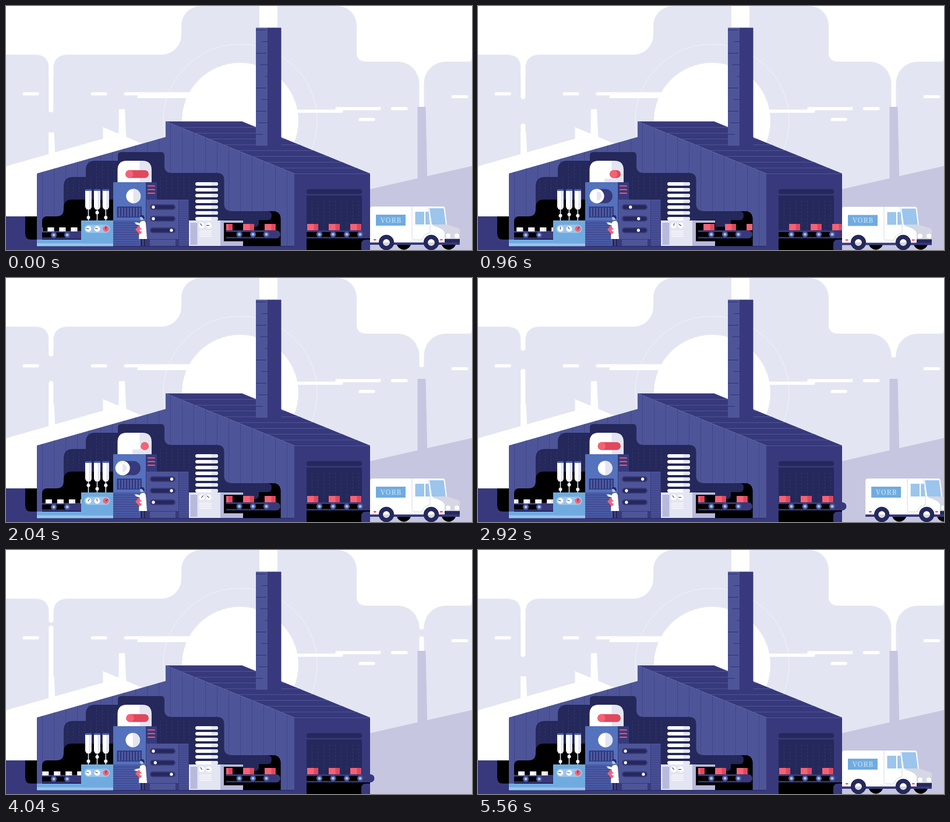
Write an HTML page that moves like this. It is 800 by 421 pixels and loops after 5600 ms.

```html
<!DOCTYPE html>
<html lang="en">
<head>
<meta charset="utf-8">
<title>Factory</title>
<style>
  html, body { margin: 0; width: 100%; height: 100%; overflow: hidden; background: #fff; }
  svg { display: block; width: 100vw; height: 100vh; }
  .sky { fill: #e3e5f2; } .hill { fill: #c6c6e0; } .white { fill: #fff; }
  .wall { fill: #4d5598; } .navy { fill: #37397c; } .dark { fill: #25285a; }
  .blue { fill: #70abdf; } .pale { fill: #9bc5ec; }
  .red { fill: #f46273; } .crimson { fill: #e0485d; }
  .line { fill: none; stroke-linecap: round; }
  .cloud { stroke: #fff; stroke-width: 5.4; }
  .smoke { stroke: #fff; stroke-width: 8; }
  .hand { stroke: #25285a; stroke-width: 1; }
  .sign { font: 900 12px "Noto Serif", "DejaVu Serif", serif; letter-spacing: .5px; fill: #b0d5f5; }
</style>
</head>
<body>
<svg viewBox="0 0 800 421" preserveAspectRatio="none">
  <defs>
    <pattern id="planks" x="52" width="20" height="20" patternUnits="userSpaceOnUse"><path d="M10.5 0V20" stroke="#40468a"/></pattern>
    <pattern id="tiles" y="204" width="20" height="10" patternUnits="userSpaceOnUse"><path d="M0 5.5H20" stroke="#4d5598"/></pattern>
    <pattern id="mesh" x="525" width="10" height="6" patternUnits="userSpaceOnUse"><path d="M.5 0V3" stroke="#34376d"/></pattern>
    <pattern id="ribs" y="372" width="10" height="4" patternUnits="userSpaceOnUse"><path d="M0 2.5H10" stroke="#3d4389"/></pattern>
    <pattern id="bars" x="193" width="5" height="10" patternUnits="userSpaceOnUse"><path d="M1.5 0V10" stroke="#5472bd" stroke-width="1.6"/></pattern>
    <clipPath id="leftBelt"><path d="M62 375H129V392H62Z"/></clipPath>
    <clipPath id="midBelt"><path d="M378 370H471V390H378Z"/></clipPath>
    <clipPath id="rightBelt"><path d="M516 370H625V390H516Z"/></clipPath>
    <clipPath id="dome"><path d="M191.500 304V283Q191.500 267 207.500 267H234Q250 267 250 283V304Z"/></clipPath>
  </defs>

  <!-- sky -->
  <path class="sky" d="M0 84H50Q73.500 84 73.500 108V240H81.500V108Q81.500 84 106 84H266C286 84 301 69 301 49V35C301 15 316 0 336 0H435V37H466V0H568C588 0 602 15 602 34V80Q602 96 618 96H672C693 96 709.500 113 709.500 134V200H717.500V134C717.500 113 734 96 756 96H797Q800 95 800 84V421H0Z"/>
  <path class="sky" d="M73 121V240H82V121A4.250 4.250 0 0 1 73 121ZM709 133V200H718V133A4.250 4.250 0 0 1 709 133Z"/>
  <g id="smoke"></g>
  <circle class="white" cx="402" cy="198" r="100"/>
  <circle cx="402" cy="198" r="132" fill="none" stroke="#fff" stroke-dasharray="1.500 1"/>
  <path class="line cloud" d="M31 151.500H54M148 151.500H171M205 151.500H330M228 156.200H330M490 181.500H576M568 177H641M663.500 177H687M608 195.800H631M767.500 156.500H791"/>
  <path class="white" d="M73 218H82.500L84.500 260H73ZM194 178H204L207 240H193ZM0 276.500L166.500 229V209L240 240V363H0Z"/>
  <path class="hill" d="M706.500 174H720.500L723.500 310H706.500ZM625 316L800 276V421H625Z"/>
  <path class="navy" d="M0 363H53V421H0Z"/>
  <path d="M33 363H54V403H43Q33 403 33 393Z"/>

  <!-- building -->
  <path id="front" class="wall" d="M53 289L274 226V199L495 289V421H53Z"/>
  <path fill="url(#planks)" d="M53 289L274 226V199L495 289V421H53Z"/>
  <path class="navy" d="M274 199H405L625 289V421H495V289Z"/>
  <path fill="url(#tiles)" d="M274 199H405L625 289H495Z"/>
  <path stroke="#4d5598" d="M495 289.500H625"/>
  <path class="wall" d="M429 37.500H449V241H429Z"/>
  <path class="navy" d="M449 37.500H472.500V241H449Z"/>
  <path stroke="#2e3171" d="M429 41.500H447M439 61.500H449M429 81.500H447M436 101.500H449M445 121.500H449M429 141.500H447M439 161.500H449M429 181.500H447M433 201.500H449M429 221.500H441"/>

  <!-- loading door -->
  <rect class="dark" x="516" y="316" width="95" height="8.500" rx="4"/>
  <path class="dark" d="M516 327H611V388H516Z"/>
  <path fill="url(#mesh)" d="M520 333H607V386H520Z"/>
  <path d="M516 388H625V421H516Z"/>
  <path class="navy" d="M625 403V421H610V411Q610 403 618 403Z"/>

  <!-- cutaway -->
  <path class="dark" id="room" d="M62 414V372Q62 363 71 363H87Q99 363 99 351V311Q99 295 115 295H137V283Q137 267 153 267H192V258Q192 252 198 252H266Q272 252 272 258V276Q272 288 284 288H362Q374.500 288 374.500 300V341Q374.500 354 388 354H458Q471.500 354 471.500 368V414Z"/>
  <path fill="url(#mesh)" d="M103 300H190V331H103ZM152 271H190V300H152ZM262 293H324V331H262Z"/>
  <path d="M62 403V372Q62 363 71 363H87Q99 363 99 351V348Q99 334 113 334H184V403Z"/>
  <path d="M374 369.500H407V414H374ZM407 381H428Q434 381 434 375V369.500H449Q456 369.500 456 362Q456 354 449 354H458Q471.500 354 471.500 368V414H407Z"/>
  <path class="navy" d="M53 414H495V421H53Z"/>
  <path stroke="#25285a" d="M53 414.500H495"/>

  <!-- filling line -->
  <g id="belts"></g>
  <path class="blue" d="M53 403H184V410H53Z"/>
  <path class="pale" d="M53 409.500H184V414.500H53Z"/>
  <g clip-path="url(#leftBelt)"><g id="cartons"></g></g>
  <path class="blue" d="M129 370H184V409.500H129Z"/>
  <rect class="pale" x="134.500" y="377.500" width="44" height="14" rx="7"/>
  <g id="tubes"></g>

  <!-- press -->
  <g clip-path="url(#dome)">
    <path class="white" d="M191 267H230V304H191Z"/>
    <path class="sky" d="M229.500 267H250V304H229.500Z"/>
    <rect id="tab" class="sky" x="217" y="304" width="20" height="12" rx="2"/>
  </g>
  <path id="plunger" class="line" stroke="#e0485d" stroke-width="13.400"/>
  <circle id="plungerTip" class="red" cy="290" r="6.700"/>
  <path fill="#5472bd" d="M184 304H240V370H184Z"/>
  <path class="navy" d="M240 304H259V334H240Z"/>
  <path class="line" stroke="#f05a6c" stroke-width="2" d="M244 310.500H255M244 316.700H255M244 322.900H255"/>
  <path id="dialSlot" class="line" stroke="#37397c" stroke-width="24.600"/>
  <g id="dial"><circle class="white" r="12.500"/><path id="dialShade" class="sky" d="M0 -12.500A12.500 12.500 0 0 1 0 12.500Z"/></g>
  <path class="navy" d="M190.500 346H233V365H190.500Z"/>
  <path fill="url(#bars)" d="M192 348H232V363.500H192Z"/>
  <path fill="#4a5aa5" d="M184 370H240V414H184Z"/>
  <path fill="url(#ribs)" d="M184 372H228V412H184Z"/>

  <!-- control cabinet -->
  <path class="wall" d="M240 334H297V414H240Z"/>
  <path fill="#474e94" d="M297 334H313.500V414H297Z"/>
  <path fill="url(#ribs)" d="M298 335H312V412H298Z"/>
  <path stroke="#37397c" d="M296.500 334V414M247 402.500H291M240.500 334V414"/>
  <path class="navy" d="M240 402H247V414H240ZM291 402H297V414H291Z"/>
  <path class="line" stroke="#37397c" stroke-width="10" d="M252 347H286M252 367H286M252 387H286"/>
  <path class="line" stroke="#25285a" stroke-width="6" d="M252 347H286M252 367H286M252 387H286"/>
  <g class="white"><circle class="knob" cy="347" r="2.700"/><circle class="knob" cy="367" r="2.700"/><circle class="knob" cy="387" r="2.700"/></g>

  <!-- engineer -->
  <path class="dark" d="M231 400H234.500V414H231ZM236 400H239.500V414H236Z"/>
  <path class="white" d="M230 373Q233 370 238 371L240 374L242 402H228Z"/>
  <circle class="pale" cx="233.500" cy="366" r="3.500"/>
  <path class="dark" d="M229.500 363Q231 360 235 361Q239 363 237 369L234.500 365Z"/>
  <g id="arm"><path class="line" stroke="#fff" stroke-width="3.500" d="M233 378L224 375"/><circle class="pale" cx="222.500" cy="374" r="1.600"/></g>
  <path class="red" d="M222 386L228 379L235 388L230 394Z"/>
  <path class="line" stroke="#fff" stroke-width="3" d="M238 378L237 389L231 387"/>

  <!-- packing machine -->
  <path class="line" stroke="#fff" stroke-width="6" d="M328 307H361M328 317H361M328 327H361M328 337H361M328 347H361M328 357H361M328 367H361"/>
  <path class="line" stroke="#e3e5f2" stroke-width="6" d="M355 307H361M355 317H361M355 327H361M355 337H361M355 347H361M355 357H361M355 367H361"/>
  <path class="sky" d="M314 370H368V414H314Z"/>
  <path fill="#b7badb" d="M316.500 374H328.500V412H316.500ZM368 370H407V374H374V406H407V414H368Z"/>
  <path stroke="#fff" d="M332 388.500H353M332 391.500H353M332 394.500H353M332 397.500H353"/>
  <g id="gauges"></g>
  <g clip-path="url(#midBelt)"><g id="midBoxes"></g></g>
  <g clip-path="url(#rightBelt)"><g id="rightBoxes"></g></g>

  <!-- van -->
  <g id="van">
    <circle cx="683" cy="408" r="12.500"/><circle cx="760" cy="408" r="12.500"/>
    <g id="vanBody">
      <path class="white" d="M625 410V350Q625 346 629 346H750Q753 346 753.500 349L757 378L775 383Q779 384 779 389V410Z"/>
      <path fill="#d5d7e2" d="M733 377H757L775 383Q779 384 779 389V402H753V392Q752 384 733 379Z"/>
      <path class="pale" d="M727 349H751.500L755 377H731ZM702.500 355H718V377H702.500ZM720 355H725.500L727.500 377H720Z"/>
      <path fill="none" stroke="#d5d7e2" d="M697 346V399Q697 403.500 701 403.500H714Q716 394 728 391V377L725 347"/>
      <circle class="white" cx="759" cy="396.500" r="4"/><circle class="white" cx="774" cy="396.500" r="4"/>
      <path class="dark" d="M753 402H779V411H753Z"/>
      <path class="navy" d="M625 408H779V412H625Z"/>
      <path class="line" stroke="#f05a6c" stroke-width="2.600" d="M632 403.300H634.500M746 403.300H748.500"/>
      <path class="blue" d="M635 360H686V379H635Z"/>
      <text class="sign" x="660.700" y="374" text-anchor="middle">VORB</text>
    </g>
    <g id="wheels"></g>
  </g>
</svg>
<script>
const LOOP = 5.6, BEAT = 1.4;
const $ = id => document.getElementById(id);
const NS = "http://www.w3.org/2000/svg";
function add(parent, tag, attrs) {
  const el = document.createElementNS(NS, tag);
  for (const k in attrs) el.setAttribute(k, attrs[k]);
  return parent.appendChild(el);
}
const set = (el, k, v) => el.setAttribute(k, v);
const clamp = v => Math.max(0, Math.min(1, v));
const span = (t, a, b) => clamp((t - a) / (b - a));
const quad = p => p < .5 ? 2 * p * p : 1 - 2 * (1 - p) ** 2;
const cubic = p => p < .5 ? 4 * p ** 3 : 1 - 4 * (1 - p) ** 3;
const mix = (a, b, p) => a + (b - a) * p;

// eased value from a list of [time, value] steps
function track(steps, t) {
  for (let i = 1; i < steps.length; i++) {
    const [a, v] = steps[i - 1], [b, w] = steps[i];
    if (t <= b) return mix(v, w, quad(span(t, a, b)));
  }
  return steps[steps.length - 1][1];
}

// smoke columns: [x, lower end at time 0, lowest fixed point, base]
const RISE = 132, PUFF = 90;
const columns = [[77.3, 183.5, 125, 240], [713.5, 202, 137, 200]].map(([x, end, nub, base]) => ({
  x, end, nub, base,
  puffs: [0, 1, 2].map(() => add($("smoke"), "path", { class: "line smoke" }))
}));

function belt(x, right, rollers, y, round) {
  const g = $("belts"), end = round ? 7 : 0;
  add(g, "path", { class: "navy", d: `M${x} ${y}H${right - end}a${end} 7 0 0 1 0 14H${x}Z` });
  add(g, "path", { d: `M${x} ${y + 3}H${rollers[rollers.length - 1]}V${y + 11.5}H${x}Z` });
  for (const cx of rollers) {
    add(g, "circle", { class: "wall", cx, cy: y + 7, r: 5.2 });
    add(g, "circle", { class: "pale", cx, cy: y + 7, r: 2.5 });
  }
}
belt(62, 129, [82, 105], 388, false);
belt(378, 471, [400.5, 424, 447], 387, true);
belt(516, 632.5, [538, 561.5, 585, 608], 387, true);

function box(parent, x, y, w, h, split, left, right) {
  add(parent, "rect", { class: left, x, y, width: w, height: h });
  add(parent, "rect", { class: right, x: x + split, y, width: w - split, height: h });
}
for (let i = 0; i < 6; i++) box($("cartons"), 31.3 + 20 * i, 382, 11, 7, 7, "white", "sky");
for (let i = 0; i < 4; i++) {
  box($("midBoxes"), 333 + 37 * i, 376, 18.7, 11, 11.5, "red", "crimson");
  box($("rightBoxes"), 480 + 37 * i, 376, 18.7, 11, 11.5, "red", "crimson");
}

const beads = [141.5, 156.5, 171.3].map(x => {
  const g = $("tubes");
  add(g, "path", { stroke: "#e3e5f2", "stroke-width": 1.6, d: `M${x} 350V370` });
  add(g, "path", { class: "white", d: `M${x - 5.5} 317H${x + 5.5}V347L${x + 3} 351H${x - 3}L${x - 5.5} 347Z` });
  add(g, "path", { class: "sky", d: `M${x + 1} 317H${x + 5.5}V347L${x + 3} 351H${x + 1}Z` });
  add(g, "path", { fill: "#4161ad", d: `M${x - 5.5} 316H${x + 5.5}V319H${x - 5.5}Z` });
  return add(g, "circle", { class: "white", cx: x, r: 3 });
});

// gauges: [x, y, colour class, middle angle, swing]
const gauges = [
  [141.5, 384.5, "white", -25, -55], [156.5, 384.5, "white", -40, -30], [171.5, 384.5, "red", 25, -25],
  [336, 378.5, "white", 0, -40], [348, 378.5, "white", -70, -20]
].map(([x, y, cls, mid, swing]) => {
  const g = add($("gauges"), "g", { transform: `translate(${x} ${y})` });
  add(g, "circle", { class: cls, r: 5 });
  return { el: add(g, "path", { class: "hand", d: "M0 1V-4" }), mid, swing };
});

for (const cx of [653, 730]) {
  add($("wheels"), "circle", { class: "dark", cx, cy: 408, r: 13.2 });
  add($("wheels"), "circle", { class: "white", cx, cy: 408, r: 5.8 });
  add($("wheels"), "path", { fill: "#d5d7e2", d: `M${cx - 5.8} 408a5.8 5.8 0 0 0 11.6 0Z` });
}

const knobs = document.querySelectorAll(".knob");
const HIGH = [[0, 253], [.7, 253], [1.4, 284.5], [2.8, 284.5], [3.5, 253], [4.2, 253], [4.9, 269], [5.6, 253]];
const LOW = [[0, 284], [.7, 284], [1.4, 253], [2.8, 253], [3.5, 284], [4.2, 284], [4.9, 273], [5.6, 284]];

function draw(t) {
  const beat = t % BEAT;
  const p = 1 - Math.abs(beat / (BEAT / 2) - 1);
  const e = cubic(p);

  for (const c of columns) {
    c.puffs.forEach((el, i) => {
      const low = c.end - RISE * t / LOOP + RISE * i;
      const top = Math.max(low - PUFF, c.nub - 20) + 4;
      const end = Math.min(low - 4, c.base);
      set(el, "d", end > top ? `M${c.x} ${top}V${end}` : "");
    });
  }

  set($("cartons"), "transform", `translate(${(t * 80 / BEAT) % 20} 0)`);
  const push = 37 * quad(span(beat, .74, 1.2));
  set($("midBoxes"), "transform", `translate(${push} 0)`);
  set($("rightBoxes"), "transform", `translate(${push} 0)`);

  beads.forEach((el, i) => set(el, "cy", i === 1 ? 356.5 + 8.5 * p * p : 365 - 8.5 * p * p));
  const wave = Math.cos(2 * Math.PI * t / BEAT);
  for (const g of gauges) set(g.el, "transform", `rotate(${g.mid + g.swing * wave})`);

  const tip = mix(211.8, 238.2, e), dial = mix(218.7, 200.2, e);
  set($("plunger"), "d", `M${tip} 290H238.300`);
  set($("plungerTip"), "cx", tip);
  set($("tab"), "y", 304 - 8 * e);
  set($("dialSlot"), "d", `M${dial} 328H218.700`);
  set($("dial"), "transform", `translate(${dial} 328)`);
  set($("dialShade"), "transform", `scale(${mix(1, .56, e)})`);

  set(knobs[0], "cx", track(HIGH, t));
  set(knobs[1], "cx", mix(253, 284.5, quad(p)));
  set(knobs[2], "cx", track(LOW, t));

  const lift = track([[0, 0], [3.5, 0], [4, -30], [4.5, 0]], t);
  set($("arm"), "transform", `rotate(${lift} 233 378)`);

  const away = t < 3.8 ? 340 * span(t, 2.1, 3.5) ** 4 : 230 * (1 - span(t, 4.06, 5)) ** 3;
  set($("van"), "transform", `translate(${away} 0)`);
  const bob = t < 2.1 ? .25 * (1 - Math.cos(2 * Math.PI * t / .7)) : 0;
  set($("vanBody"), "transform", `translate(0 ${bob})`);
}

const start = performance.now();
function tick() {
  draw(((performance.now() - start) / 1000) % LOOP);
  requestAnimationFrame(tick);
}
tick();
</script>
</body>
</html>
```
